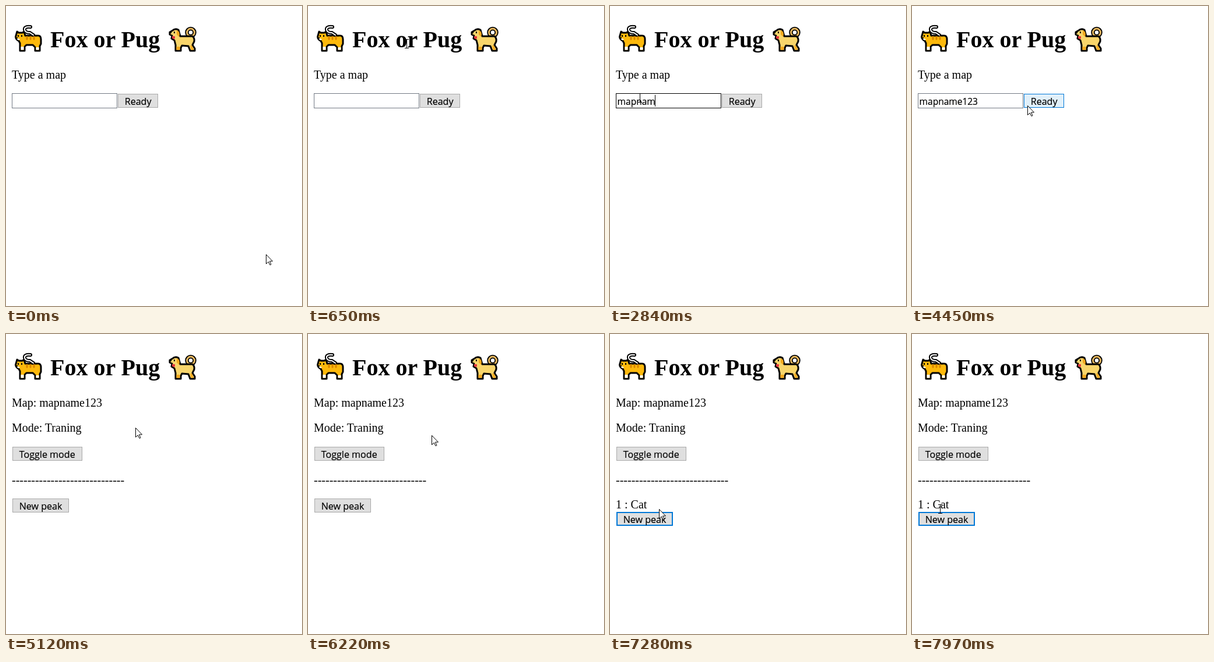
Write an HTML page that moves like this. It is 508 px wide and 516 px high and loops after 8 s.

```html
<!DOCTYPE html>
<html lang="en">
<head>
<meta charset="utf-8">
<title>Map voting</title>
<style>
  html, body { margin: 0; width: 100%; height: 100%; overflow: hidden; background: #fff; }
  svg { display: block; }
  text { font-family: "Liberation Serif", "Times New Roman", serif; font-size: 20px; white-space: pre; }
  .title { font-size: 40px; font-weight: bold; }
  .ui { font-family: "Open Sans", "Noto Sans", sans-serif; font-size: 16.1px; stroke: #000; stroke-width: .2; }
  #typed { font-size: 15.5px; }
  .ink { stroke: #000; stroke-width: 3; stroke-linejoin: round; }
  .line { fill: none; stroke-linecap: round; }
</style>
</head>
<body>
<svg width="508" height="516" viewBox="0 0 508 516">
  <rect width="508" height="516" fill="#fff"/>

  <g id="cat">
    <path class="ink" fill="#fdb90c" d="M19 44L22 46H28L31 44L33 51H53Q60 50 60 57V65L58 69V77H50V71L46 67H35L32 70V77H24V64L22 60Q17 58 16.500 53Z"/>
    <path class="line" d="M42 36Q31 35 32 41Q33 46 41 46L47 50" stroke="#000" stroke-width="6"/>
    <path class="line" d="M42 36Q31 35 32 41Q33 46 41 46L47 50" stroke="#fff" stroke-width="2"/>
    <path fill="#fff" d="M25.500 70H30.500V75.500H25.500ZM51.500 71H56.500V75.500H51.500ZM18 55L24 57L22 59Q19 58 18 55Z"/>
    <path class="line" d="M36 53V57M42 53V57M48 53V57" stroke="#d98500" stroke-width="3"/>
    <path d="M20 50h2v3h-2zM26 50h2v3h-2zM17 54h3v2h-3z"/>
  </g>

  <g id="dog">
    <circle cx="317" cy="45.500" r="6.500" fill="none" stroke="#000" stroke-width="6.500"/>
    <circle cx="317" cy="45.500" r="6.500" fill="none" stroke="#e9b95f" stroke-width="2.800"/>
    <path class="ink" fill="#f8d56b" d="M286 42Q290 38 296 41L299 52H320Q324 55 323 61L320 67L324 73V77H316L313 69L302 68L300 72V77H291V67L289 59L284 56L285 51L281 49V45Z"/>
    <path fill="#f3a91d" d="M293 42Q298 43 298 49L297 53L293 49ZM292.500 70H298.500V75.500H292.500ZM316 68H319L322 75.500H318Z"/>
    <path fill="#e4373d" d="M285 52H290V56Q287 58 285 55Z"/>
    <path d="M280 44h4v3h-4zM288 44h2v3h-2z"/>
  </g>

  <text class="title" x="76" y="71">Fox or Pug</text>

  <g id="form">
    <text x="10" y="125">Type a map</text>
    <rect id="field" x="10.5" y="150.5" width="180" height="25" fill="#fff"/>
    <text id="typed" class="ui" x="12.6" y="170"></text>
    <rect id="caret" y="153" width="1" height="20"/>
    <g id="ready"></g>
  </g>

  <g id="board">
    <text x="10" y="125">Map: mapname123</text>
    <text x="10" y="168">Mode: Traning</text>
    <g id="toggle"></g>
    <text id="rule" x="10" y="258"></text>
    <text id="vote" x="10" y="300">1 : Cat</text>
    <g id="peak"></g>
  </g>

  <path id="arrow" d="M.5 .5V16.500L4.300 13L7 18.500L9 17.500L6.500 12H11.500Z" fill="#fff" stroke="#000"/>
  <path id="beam" d="M-3 -7.500H4M-3 7.500H4M.5 -7.500V7.500" fill="none" stroke="#000"/>
</svg>

<script>
const LOOP = 8000;
const FOCUS = 930, PRESS = 4840, RELEASE = 4930, OPEN = 5120;
const PEAK_HOVER = 6820, PEAK_PRESS = 7080, VOTE = 7180;

const $ = id => document.getElementById(id);
const set = (el, attrs) => { for (const k in attrs) el.setAttribute(k, attrs[k]); };
const show = (el, on) => el.style.display = on ? "" : "none";

const home = [446, 427];
// Each move eases to a point; bend pushes its middle down or up
const moves = [
  { from: 160, to: 930, at: [51, 158], bend: -215 },
  { from: 4000, to: 4450, at: [198, 171], bend: -8 },
  { from: 4450, to: 4960, at: [222, 161], bend: 8 },
  { from: 5120, to: 5670, at: [215, 172], bend: -6 },
  { from: 5800, to: 5960, at: [213, 173], bend: 0 },
  { from: 6190, to: 6790, at: [84, 301], bend: 0 },
  { from: 7280, to: 7780, at: [42, 292], bend: 0 },
  { from: 7920, to: 7970, at: [48, 301], bend: 0 }
];

function pointer(t) {
  let [x, y] = home;
  for (const { from, to, at, bend } of moves) {
    if (t < from) break;
    const u = Math.min(1, (t - from) / (to - from));
    const e = u * u * (3 - 2 * u);
    x += (at[0] - x) * e;
    y += (at[1] - y) * e + bend * Math.sin(Math.PI * e);
  }
  return [Math.round(x), Math.round(y)];
}

// Typing comes in bursts of evenly spaced keys
const word = "mapname123";
const burst = (start, count, gap) => Array.from({ length: count }, (_, i) => start + i * gap);
const keys = [
  ...burst(1860, 3, 130), ...burst(2550, 2, 90),
  ...burst(2840, 2, 190), ...burst(3330, 3, 200)
];

// Hidden elements have an empty box and are never hit
function hit(el, [x, y]) {
  const b = el.getBBox();
  return x >= b.x && x < b.x + b.width && y >= b.y && y < b.y + b.height;
}

const looks = {
  plain: ["#dfdfdf", "#a9a9a9", 1],
  hover: ["#e1f0fa", "#0078d7", 1],
  press: ["#cce4f7", "#005499", 1],
  focus: ["#dfdfdf", "#0078d7", 2]
};

function button(id, x, y, w, label) {
  const el = $(id);
  el.innerHTML = `<rect/><text class="ui" x="${x + 11.7}" y="${y + 19}">${label}</text>`;
  return look => {
    const [fill, stroke, n] = looks[look];
    set(el.firstChild, {
      x: x + n / 2, y: y + n / 2, width: w - n, height: 24 - n,
      fill, stroke, "stroke-width": n
    });
  };
}

$("rule").textContent = "-".repeat(29);
const ready = button("ready", 192, 151, 69, "Ready");
const toggle = button("toggle", 11, 194, 120, "Toggle mode");
const peak = button("peak", 11, 283, 97, "New peak");
const beamAreas = [...document.querySelectorAll("text:not(.ui), #field")];
toggle("plain");

function drawForm(t, p) {
  const dark = Math.round(70 * Math.max(0, Math.min(1, (1130 - t) / 200)));
  set($("field"), { stroke: hit($("field"), p) ? `rgb(${dark},${dark},${dark})` : "#737a84" });

  const count = keys.filter(k => t >= k).length;
  const typed = $("typed");
  typed.textContent = word.slice(0, count);
  const width = count ? typed.getComputedTextLength() : 0;
  set($("caret"), { x: Math.max(13, Math.floor(12.6 + width)) });

  // The blink restarts at every key
  const since = t - (count ? keys[count - 1] : FOCUS);
  show($("caret"), t >= FOCUS && t < PRESS && since % 1060 < 530);

  const pressed = t >= PRESS && t < RELEASE;
  ready(pressed ? "press" : hit($("ready"), p) ? "hover" : "plain");
}

function drawBoard(t) {
  const voted = t >= VOTE;
  show($("vote"), voted);
  set($("peak"), { transform: `translate(0 ${voted ? 23 : 0})` });
  peak(voted ? "focus" : t >= PEAK_PRESS ? "press" : t >= PEAK_HOVER ? "hover" : "plain");
}

function draw(t) {
  const p = pointer(t), open = t >= OPEN;
  show($("form"), !open);
  show($("board"), open);
  if (open) drawBoard(t); else drawForm(t, p);

  const beam = beamAreas.some(el => hit(el, p));
  show($("beam"), beam);
  show($("arrow"), !beam);
  set($(beam ? "beam" : "arrow"), { transform: `translate(${p})` });
}

const start = performance.now();
function tick() {
  draw((performance.now() - start) % LOOP);
  requestAnimationFrame(tick);
}
tick();
</script>
</body>
</html>
```
